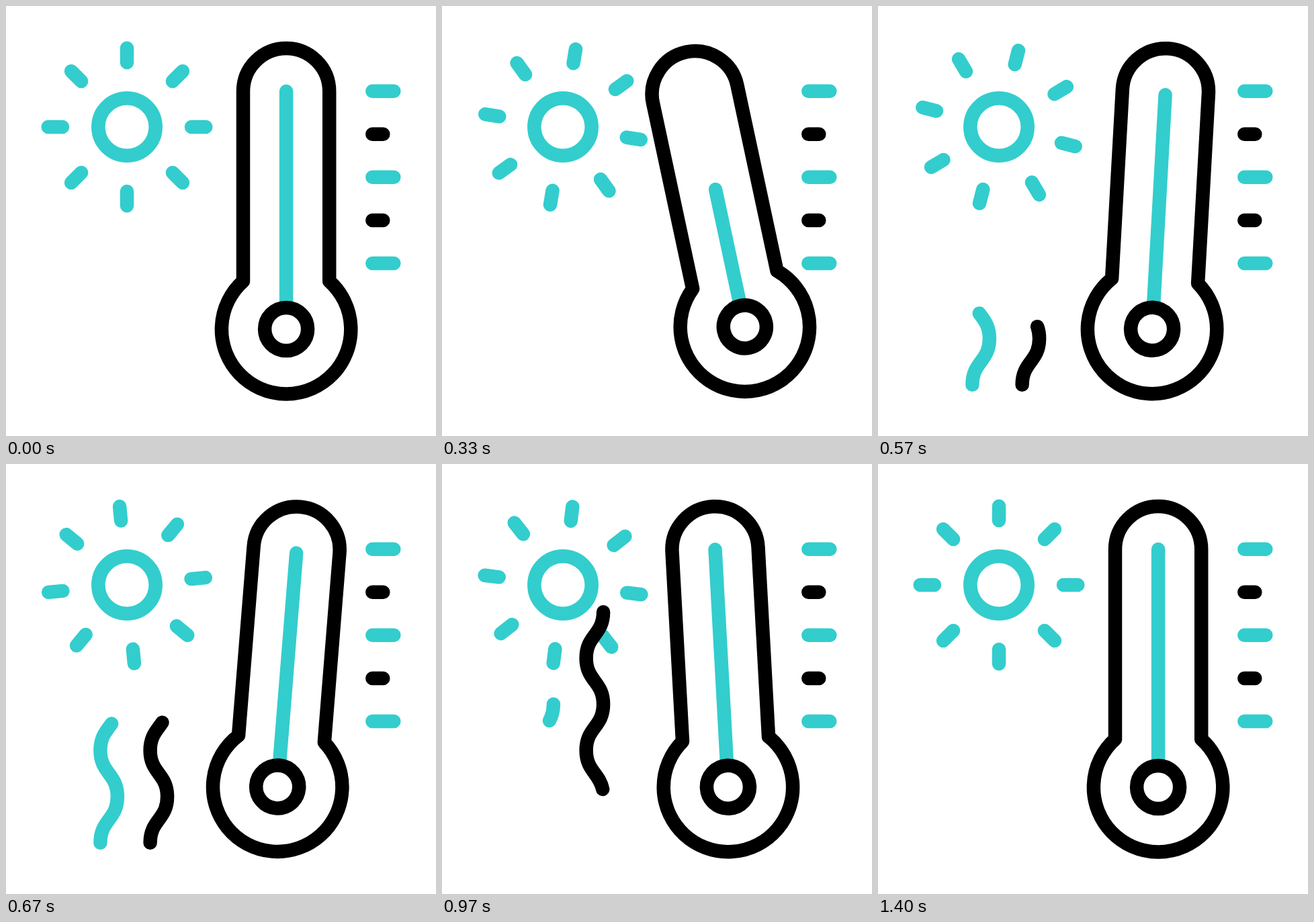
Animation, 640 px wide and 640 px high, one loop 1.67 s. Source, as an HTML page:

```html
<!DOCTYPE html>
<html lang="en">
<head>
<meta charset="utf-8">
<title>Thermometer</title>
<style>
  html, body { margin: 0; width: 100%; height: 100%; overflow: hidden; background: #fff; }
  svg { display: block; width: 100vw; height: 100vh; }
  g, path { fill: none; stroke-width: 20.5; stroke-linecap: round; stroke-linejoin: round; }
  .teal { stroke: #33cdcd; }
  .ink { stroke: #000; }
</style>
</head>
<body>
<svg viewBox="0 0 640 640">
  <g class="teal">
    <circle cx="180" cy="180" r="42.7"/>
    <path id="rays"/>
    <path d="M545.3 126.8h32M545.3 254.8h32M545.3 383h32"/>
  </g>
  <path class="ink" d="M545.3 190.8h16M545.3 319h16"/>
  <g id="meter">
    <path class="teal" id="mercury"/>
    <g class="ink">
      <path d="M353 409.5V127a64.1 64.1 0 0 1 128.2 0V409.5A96.2 96.2 0 1 1 353 409.5Z"/>
      <circle cx="417.1" cy="481" r="32"/>
    </g>
  </g>
  <path class="teal" id="steamA"/>
  <path class="ink" id="steamB"/>
</svg>
<script>
const LOOP = 1670;
const $ = id => document.getElementById(id);
const set = (el, attrs) => { for (const k in attrs) el.setAttribute(k, attrs[k]); };

// Keys are [step, value]; 30 steps make one second.
const SPIN = [[1, 0], [10, 54.3], [17, 104.3], [23, 153.9], [29, 187], [34, 196.8], [42, 180]];
const SWING = [[1, 0], [9.4, -13.4], [18.4, 6.26], [28.1, -3.85], [33, 0]];
const LEVEL = [[0, 127], [1, 449], [10, 272], [17, 132], [23, 132], [29, 127]];

// Piecewise interpolation, linear or smooth.
function track(keys, t, smooth) {
  const last = keys.length - 1;
  if (t <= keys[0][0]) return keys[0][1];
  if (t >= keys[last][0]) return keys[last][1];
  let i = 0;
  while (t > keys[i + 1][0]) i++;
  const [t0, v0] = keys[i], [t1, v1] = keys[i + 1];
  const d = t1 - t0, u = (t - t0) / d;
  if (!smooth) return v0 + (v1 - v0) * u;
  const slope = k => {
    const a = keys[Math.max(k - 1, 0)], b = keys[Math.min(k + 1, last)];
    return (b[1] - a[1]) / (b[0] - a[0]) * d;
  };
  const w = 1 - u;
  return v0 * w * w * (1 + 2 * u) + v1 * u * u * (3 - 2 * u)
    + slope(i) * u * w * w - slope(i + 1) * u * u * w;
}

const ramp = (t, from, to) => Math.min(1, Math.max(0, (t - from) / (to - from)));

// A wavy line built from alternating half waves, drawn and erased upwards.
function steam(id, x, halves, drawFrom, drawTo, wipeFrom, wipeTo) {
  const el = $(id), h = 68.7;
  let d = `M${x} 563.7`;
  for (let i = 0; i < halves; i++) {
    const dx = i % 2 ? -25.5 : 25.5;
    d += `c0 ${-h / 2} ${dx} ${-h / 2} ${dx} ${-h}`;
  }
  set(el, { d });
  const len = el.getTotalLength();
  return t => {
    const a = ramp(t, wipeFrom, wipeTo) * len;
    const b = ramp(t, drawFrom, drawTo) * len;
    set(el, {
      'stroke-dasharray': `${Math.max(b - a, 0.01)} ${len * 3}`,
      'stroke-dashoffset': -a,
      visibility: b > a ? 'visible' : 'hidden'
    });
  };
}

let rays = '';
for (let i = 0; i < 8; i++) {
  const c = Math.cos(i * Math.PI / 4), s = Math.sin(i * Math.PI / 4);
  rays += `M${180 + 96 * c} ${180 + 96 * s}L${180 + 117.3 * c} ${180 + 117.3 * s}`;
}
set($('rays'), { d: rays });

const steams = [
  steam('steamA', 140.4, 3, 12.5, 21.2, 21.2, 30),
  steam('steamB', 214.6, 5, 14.3, 25.2, 26.3, 38.1)
];

// Step times are rounded to hundredths of a second.
function stepAt(ms) {
  let n = Math.floor(ms * 0.03) + 1;
  while (n > 0 && Math.round(n / 0.3) * 10 > ms) n--;
  return n;
}

function draw(n) {
  set($('rays'), { transform: `rotate(${track(SPIN, n, true)} 180 180)` });
  set($('meter'), { transform: `rotate(${track(SWING, n)} 417.1 320)` });
  set($('mercury'), { d: `M417.1 449V${track(LEVEL, n)}` });
  steams.forEach(f => f(n));
}

const start = performance.now();
function tick() {
  draw(stepAt((performance.now() - start) % LOOP));
  requestAnimationFrame(tick);
}
tick();
</script>
</body>
</html>
```
